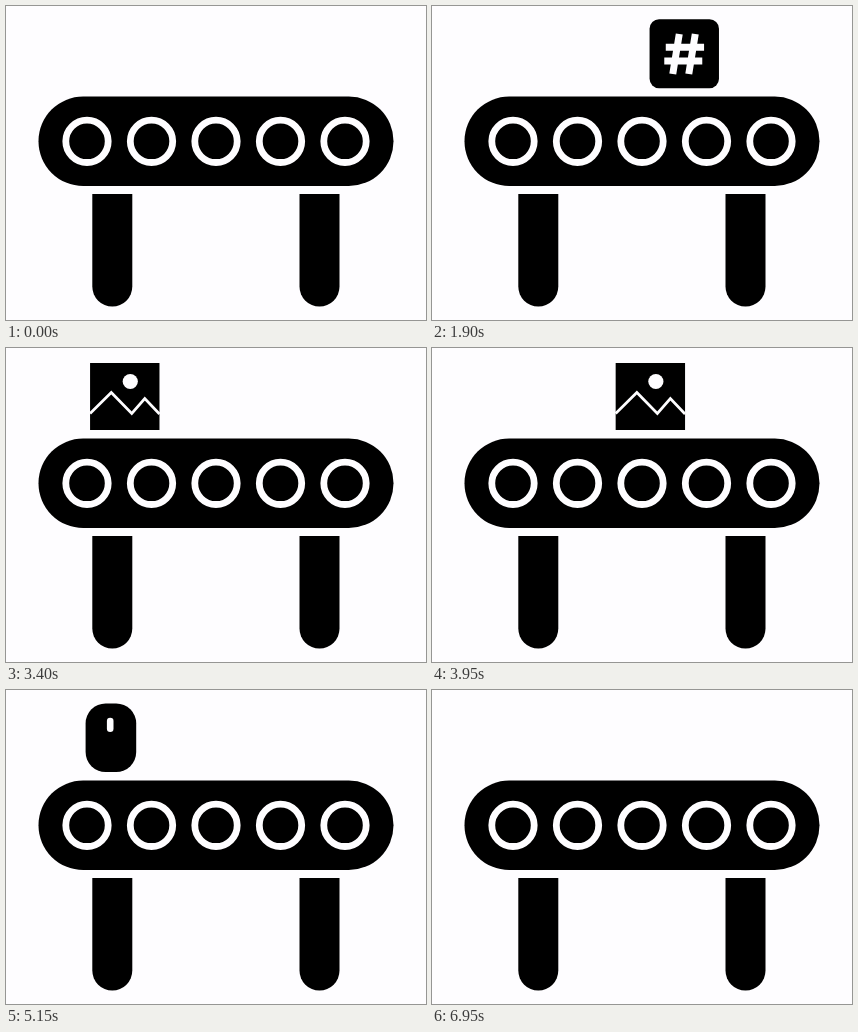
Recreate the animation shown at these times as an HTML page. Size 420x314 px, loop 7.4 s.

```html
<!DOCTYPE html>
<html lang="en">
<head>
<meta charset="utf-8">
<title>Conveyor belt</title>
<style>
  html, body { margin: 0; width: 100%; height: 100%; overflow: hidden; background: #fefdff; }
  svg { display: block; width: 420px; height: 314px; }
  .line { fill: none; stroke: #fefdff; }
  .light { fill: #fefdff; }
</style>
</head>
<body>
<svg viewBox="0 0 420 314">
  <rect x="32.5" y="90.5" width="355" height="89.5" rx="44.7"/>
  <g id="rollers" class="line" stroke-width="6.8"></g>
  <path id="leg" d="M86.300 188h40v92.500a20 20 0 0 1-40 0z"/>
  <use href="#leg" x="207.2"/>

  <g id="tag">
    <rect x="-34.700" y="13.300" width="69.400" height="69" rx="9.500"/>
    <path class="line" stroke-width="7" d="M-18.500 41.300H19.800M-20 55H18M-5 28L-11.500 68M11 28L4.500 68"/>
  </g>
  <g id="photo">
    <rect x="-34.700" y="15" width="69.400" height="67"/>
    <circle class="light" cx="5.500" cy="33.500" r="7.600"/>
    <path class="line" stroke-width="2.700" d="M-34.700 65.500L-13.500 44.500L7 65.500L20 50.500L34.700 66"/>
  </g>
  <g id="mouse">
    <rect x="-25.300" y="13.500" width="50.600" height="68.500" rx="20"/>
    <rect class="light" x="-4" y="27.700" width="6.600" height="14.300" rx="3.300"/>
  </g>
</svg>
<script>
  const LOOP = 7400, STEP = 50, LEFT = 100.5, RIGHT = 315.5, FADE_OUT = 150;

  // Times in ms: fade-in start and end, travel start and length, fade-out start
  const items = [
    { id: 'tag', show: 0, shown: 300, go: 560, travel: 2147, hide: 2700 },
    { id: 'photo', show: 2850, shown: 3050, go: 3054, travel: 1697, hide: 4750 },
    { id: 'mouse', show: 4850, shown: 5000, go: 4961, travel: 1857, hide: 6800 }
  ];
  for (const item of items) item.node = document.getElementById(item.id);

  const rollers = document.getElementById('rollers');
  for (let i = 0; i < 5; i++) {
    const ring = document.createElementNS('http://www.w3.org/2000/svg', 'circle');
    ring.setAttribute('cx', 81 + i * 64.5);
    ring.setAttribute('cy', 135.3);
    ring.setAttribute('r', 21.2);
    rollers.append(ring);
  }

  const clamp = v => Math.min(1, Math.max(0, v));

  // cubic-bezier(.42, 0, .58, 1), solved by bisection
  function ease(x) {
    let lo = 0, hi = 1;
    for (let i = 0; i < 24; i++) {
      const s = (lo + hi) / 2, r = 1 - s;
      const bx = 3 * r * r * s * 0.42 + 3 * r * s * s * 0.58 + s * s * s;
      if (bx < x) lo = s; else hi = s;
    }
    return lo * lo * (3 - 2 * lo);
  }

  function draw(time) {
    const t = Math.floor((time % LOOP) / STEP) * STEP;
    for (const { node, show, shown, go, travel, hide } of items) {
      const x = LEFT + (RIGHT - LEFT) * ease(clamp((t - go) / travel));
      const opacity = clamp((t - show) / (shown - show)) * (1 - clamp((t - hide) / FADE_OUT));
      node.setAttribute('transform', `translate(${x.toFixed(2)} 0)`);
      node.setAttribute('opacity', opacity);
    }
  }

  const start = performance.now();
  function tick() {
    draw(performance.now() - start);
    requestAnimationFrame(tick);
  }
  tick();
</script>
</body>
</html>
```
